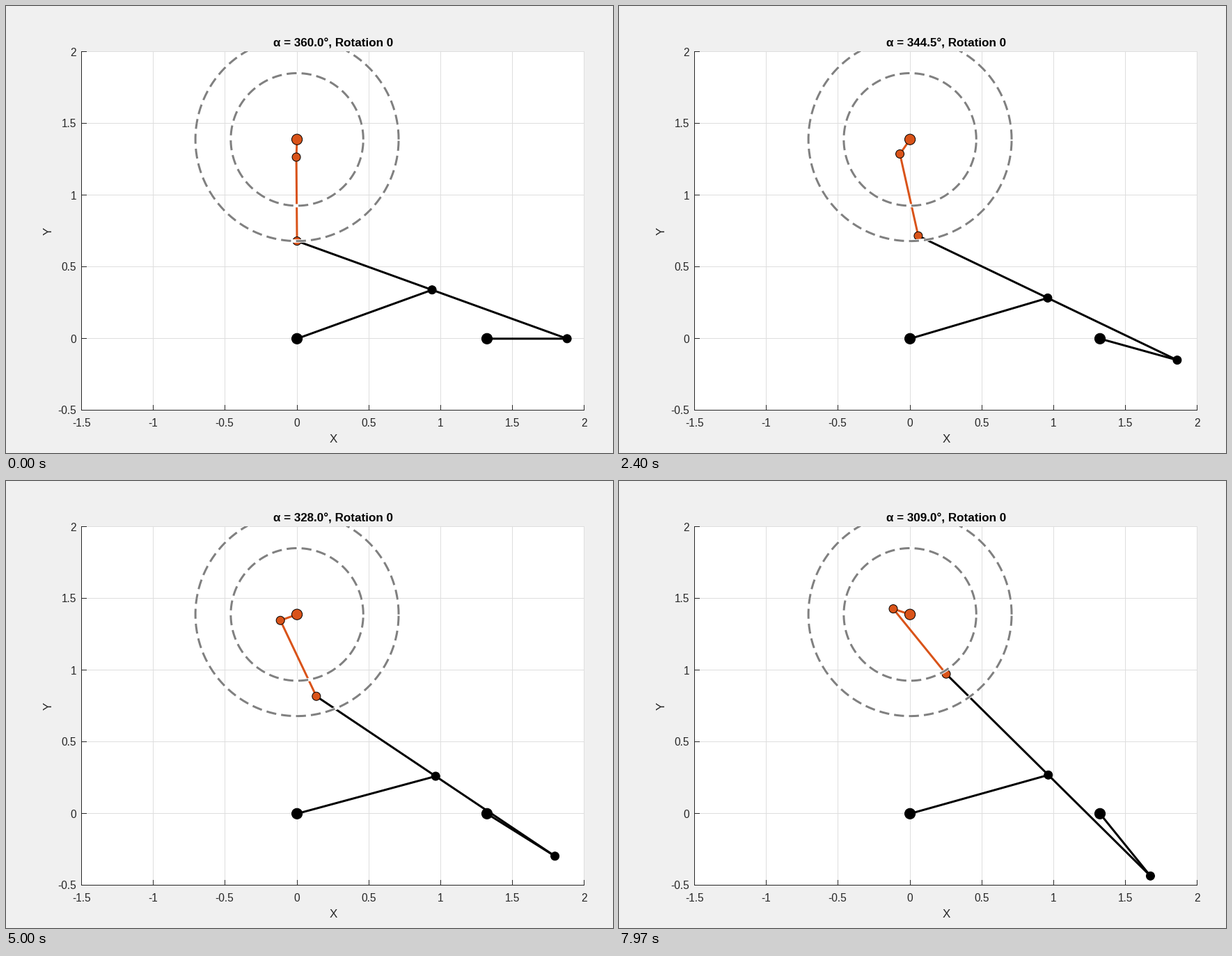
A matplotlib script for the animation above (8 s loop, 872 px wide and 642 px high).

```python
import numpy as np
import matplotlib.pyplot as plt
from matplotlib.animation import FuncAnimation
from matplotlib.patches import Circle, Rectangle

W, H, DPI = 872, 642, 64
PT = 72 / DPI                      # points per pixel
LEFT, TOP, UNIT = 108.65, 65.25, 722 / 3.5
DARK, ORANGE, GRAY, GRID = "#262626", "#d95319", "#808080", "#dedede"

# Linkage dimensions in axis units
BASE, CRANK = 1.323, 0.558
R_OUT, R_IN = 0.7077, 0.4615
ARM, ROD = (R_OUT - R_IN) / 2, (R_OUT + R_IN) / 2

# Runs of evenly spaced half-degree steps: first ms, last ms, count
RUNS = [(90, 830, 11), (900, 1620, 10), (1710, 2470, 11), (2540, 3310, 10),
        (3390, 4050, 10), (4150, 4150, 1), (4210, 5000, 11),
        (5060, 5850, 11), (5920, 6700, 11), (6770, 7490, 10),
        (7590, 7970, 6)]
STEP_TIMES = np.concatenate([np.linspace(*run) for run in RUNS])
INTERVAL, LOOP = 20, 8000

plt.rcParams["font.family"] = "Liberation Sans"
fig = plt.figure(figsize=(W / DPI, H / DPI), dpi=DPI, facecolor="#f0f0f0")
ax = fig.add_axes([0, 0, 1, 1])
ax.set(xlim=(0, W), ylim=(H, 0))
ax.axis("off")


def to_px(p):
    return LEFT + (p[0] + 1.5) * UNIT, TOP + (2 - p[1]) * UNIT


def pixel(p):
    """Centre of the pixel that holds a point."""
    return tuple(np.floor(to_px(p)) + 0.5)


def line(xs, ys, color, width, z):
    return ax.plot(xs, ys, color=color, lw=width * PT, zorder=z,
                   snap=False)[0]


def hline(x0, x1, y, color, z):
    line([x0 - 0.5, x1 + 0.5], [y, y], color, 1, z).set_solid_capstyle("butt")


def vline(x, y0, y1, color, z):
    line([x, x], [y0 - 0.5, y1 + 0.5], color, 1, z).set_solid_capstyle("butt")


def label(x, y, text, size=15.5, color=DARK, ha="center", **kw):
    return ax.text(x, y, text, fontsize=size * PT, color=color, ha=ha,
                   va="baseline", **kw)


def solve(alpha):
    """Joint positions for a crank angle in degrees."""
    a = np.radians(alpha)
    pin = np.array([BASE + CRANK * np.cos(a), CRANK * np.sin(a)])
    half = pin / 2
    dist = np.hypot(*half)
    normal = np.array([-half[1], half[0]]) / dist
    mid = half + normal * np.sqrt(1 - dist ** 2)
    return pin, mid, 2 * mid - pin


HUB = np.array([0, solve(360)[2][1] + R_OUT - 0.00012])


def elbow(tip):
    dx, dy = tip - HUB
    d = np.hypot(dx, dy)
    c = (ARM ** 2 + d ** 2 - ROD ** 2) / (2 * ARM * d)
    a = np.arctan2(dy, dx) - np.arccos(np.clip(c, -1, 1))
    return HUB + ARM * np.array([np.cos(a), np.sin(a)])


# Plot area, grid, axes and tick labels
x0, y0 = pixel((-1.5, 2))
x1, y1 = pixel((2, -0.5))
frame = Rectangle((x0 - 0.5, y0 - 0.5), x1 - x0 + 1, y1 - y0 + 1,
                  fc="white", lw=0)
ax.add_patch(frame)
for v in np.arange(-1.5, 2.1, 0.5):
    x = pixel((v, 0))[0]
    vline(x, y0, y1, GRID, 1)
    vline(x, y1 - 7, y1, DARK, 2)
    label(x - 0.4, 603.7, f"{v:g}")
for v in np.arange(-0.5, 2.1, 0.5):
    y = pixel((0, v))[1]
    hline(x0, x1, y, GRID, 1)
    hline(x0, x0 + 7, y, DARK, 2)
    label(101.3, y + 6, f"{v:g}", ha="right")
vline(x0, y0, y1, DARK, 2)
hline(x0, x1, y1, DARK, 2)
label(470, 627, "X", 17.05)
label(66, 323.5, "Y", 17.05, rotation=90, rotation_mode="anchor")
title = label(470, 58.4, "", 17.05, "black", weight="bold")

# Guide circles: dashes on a white band that covers the links
turn = np.linspace(0, 2 * np.pi, 400)
for r in (R_OUT, R_IN):
    xs, ys = to_px((r * np.cos(turn), HUB[1] + r * np.sin(turn)))
    for color, width, z in (("white", 4.8, 8), (GRAY, 3, 9)):
        ring = line(xs, ys, color, width, z)
        ring.set_clip_path(frame)
    ring.set_linestyle((0, (14.3 / 3, 7.15 / 3)))
    ring.set_dash_capstyle("butt")


def dot(radius, color, z):
    c = Circle((0, 0), radius, fc=color, ec="black", lw=PT, zorder=z)
    return ax.add_patch(c)


rocker = line([], [], "black", 3, 3)
coupler = line([], [], "black", 3, 3)
crank = line([], [], "black", 3, 3)
dyad = line([], [], ORANGE, 3, 5)
pin_dot, mid_dot = dot(6, "black", 4), dot(6, "black", 4)
tip_dot, elbow_dot = dot(6, ORANGE, 6), dot(6, ORANGE, 6)
dot(7.6, "black", 4).center = to_px((0, 0))
dot(7.6, "black", 4).center = to_px((BASE, 0))
dot(7.6, ORANGE, 6).center = to_px(HUB)


def join(artist, *points):
    artist.set_data(*zip(*map(to_px, points)))


def update(i):
    t = i * INTERVAL + INTERVAL / 2
    alpha = 360 - 0.5 * np.searchsorted(STEP_TIMES, t, side="right")
    pin, mid, tip = solve(alpha)
    knee = elbow(tip)
    join(rocker, (0, 0), mid)
    join(coupler, pin, tip)
    join(crank, (BASE, 0), pin)
    join(dyad, HUB, knee, tip)
    for d, p in ((pin_dot, pin), (mid_dot, mid),
                 (tip_dot, tip), (elbow_dot, knee)):
        d.center = to_px(p)
    title.set_text(f"α = {alpha:.1f}°, Rotation 0")
    return ()


anim = FuncAnimation(fig, update, frames=LOOP // INTERVAL, interval=INTERVAL,
                     init_func=lambda: update(0), repeat=True, repeat_delay=0)
plt.show()
```
